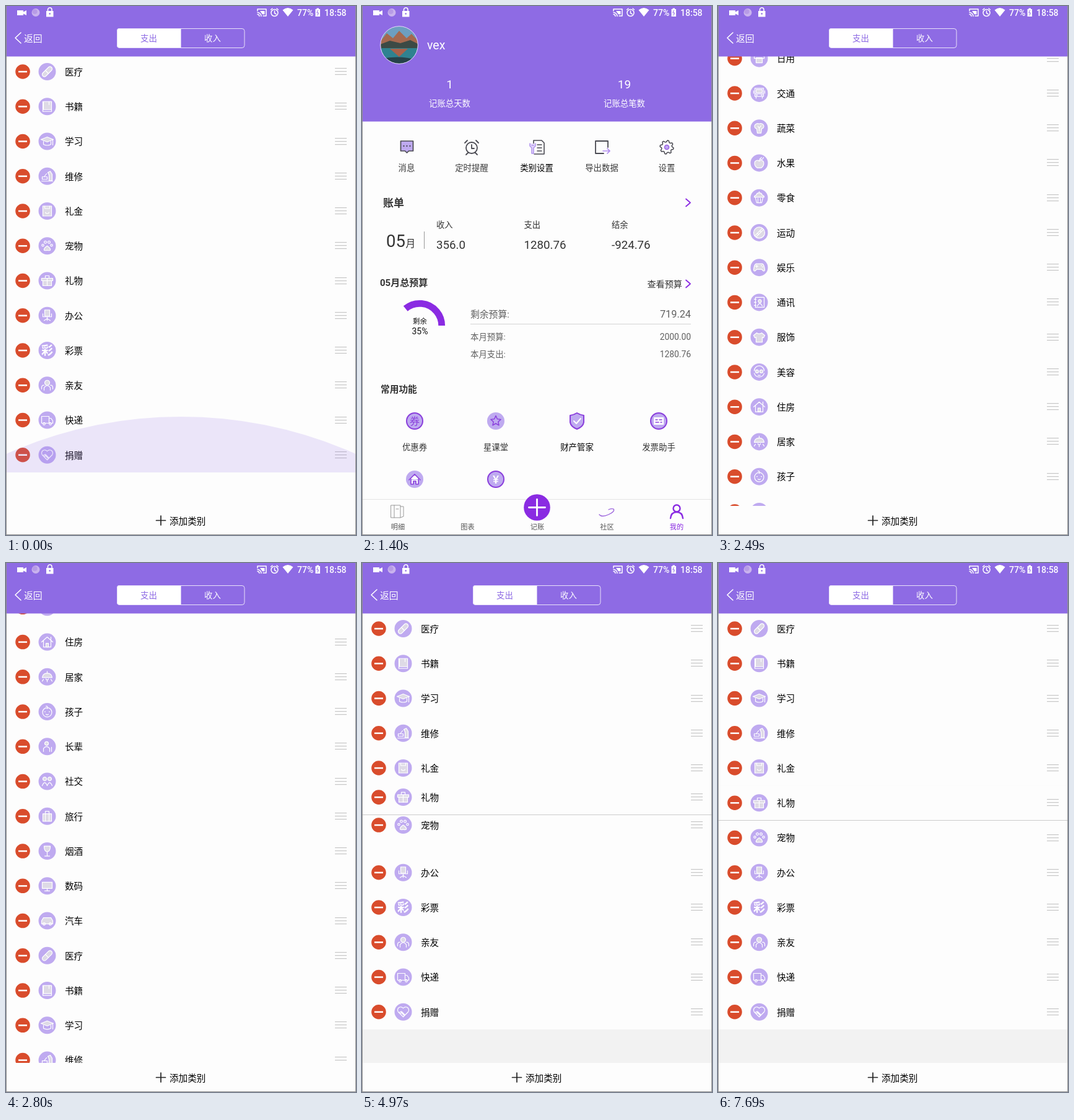
An HTML page with a canvas that plays this animation: 565 by 854 pixels, repeating every 8 s.

```html
<!DOCTYPE html>
<html lang="zh-CN">
<head>
<meta charset="utf-8">
<style>
html, body { margin: 0; width: 565px; height: 854px; overflow: hidden; background: #fdfdfd; }
canvas { display: block; }
</style>
</head>
<body>
<canvas id="stage" width="565" height="854"></canvas>
<script>
const W = 565, H = 854, ROW = 56.25, END = 1184.35, LOOP = 8000;
const PURPLE = '#8e6be4', VIVID = '#8a2be2', LILAC = '#bfaaf0', PAPER = '#fdfdfd', WHITE = '#fff';
const main = document.getElementById('stage').getContext('2d');
const layer = new OffscreenCanvas(W, H).getContext('2d');
let c = main;

const ring = (x, y, r) => `M${x - r} ${y}a${r} ${r} 0 1 0 ${2 * r} 0a${r} ${r} 0 1 0 ${-2 * r} 0`;

// name, filled outline, line work; coordinates are relative to the icon centre
const items = [
  ['餐饮', 'M-8 3A8 8 0 0 1 8 3ZM0-5V-7', 'M-9 5H9M-7 7H7'],
  ['购物', 'M-6-3H6L7 8H-7Z', 'M-3-3V-5A3 3 0 0 1 3-5V-3'],
  ['日用', 'M-5-1H5V7H-5Z', 'M-8-4Q0-10 8-4V0H-8Z'],
  ['交通', 'M-5-6H5V-1H-5Z', 'M-7-8H7V5H-7ZM-7 1H7M-5 5V8M5 5V8M-9-4V0M9-4V0M-5 3H-3M3 3H5'],
  ['蔬菜', 'M-4 1A4 4 0 0 1-7-5Q-4-9 0-7Q4-9 7-5A4 4 0 0 1 4 1L3 8H-3Z', 'M0 0V5M-2-3L0 0L3-4'],
  ['水果', 'M0-3Q-4-6-7-2Q-9 4-3 8H3Q9 4 7-2Q4-6 0-3Z', 'M0-3Q0-7 4-9M2-6Q6-5 7-9'],
  ['零食', 'M-8-1Q-8-4-5-4Q-4-8 0-8Q4-8 5-4Q8-4 8-1Z', 'M-6 0L-4 8H4L6 0M-2 1V7M2 1V7M0-8V-10'],
  ['运动', ring(0, 0, 9), 'M-7 5L5-7M-5 7L7-5M-3 1L-1 3M1-3L3-1'],
  ['娱乐', 'M-5-6H5Q8-5 9 4Q8 8 4 3H-4Q-8 8-9 4Q-8-5-5-6Z', 'M-6-2H-2M-4-4V0M3-3H4M5-1H6'],
  ['通讯', ring(1, -2, 2.5), 'M-6-8H8V8H-6ZM-8-5H-5M-8 0H-5M-8 5H-5M-3 6Q1-2 5 6'],
  ['服饰', 'M-4-7Q0-4 4-7L9-3L7 1L5 0V8H-5V0L-7 1L-9-3Z', ''],
  ['美容', ring(-3.5, -1, 2.5) + ring(3.5, -1, 2.5), 'M-8-2A8 8 0 1 1 8-2M-8 2Q-6 8 0 8Q6 8 8 2M-2 5Q0 6 2 5'],
  ['住房', 'M-2 8V2H2V8Z', 'M-9 0L0-8L9 0M-6-2V8H6V-2M6-4V-8'],
  ['居家', 'M-8 1Q-7-6 0-6Q7-6 8 1Z', 'M0-6V-9M-2 3A2 2 0 0 0 2 3M-6 4L-8 7M6 4L8 7M0 6V8'],
  ['孩子', '', ring(0, 1, 7.5) + 'M-2-9Q2-9 0-5M-4 0H-3M3 0H4M-2 4Q0 6 2 4'],
  ['长辈', ring(-1, -5, 3), 'M-6 8V3Q-1-3 4 3V8M7 8V1'],
  ['社交', ring(-4, -4, 3) + ring(4, -4, 3), 'M-8 7Q-4-3 0 7Q4-3 8 7'],
  ['旅行', 'M-7-4H7V8H-7Z', 'M-3-4V-8H3V-4M-3-4V8M3-4V8'],
  ['烟酒', 'M-5-8H5Q5 1 0 1Q-5 1-5-8Z', 'M0 1V8M-4 8H4'],
  ['数码', 'M-8-6H8V4H-8Z', 'M0 4V8M-4 8H4'],
  ['汽车', 'M-9 0L-6-5H6L9 0V5H-9Z', ring(-5, 5, 2) + ring(5, 5, 2)],
  ['医疗', 'M-7 2L2-7A3.5 3.5 0 0 1 7-2L-2 7A3.5 3.5 0 0 1-7 2Z', 'M-3-2L2 3'],
  ['书籍', 'M-6-8H7V5H-6Z', 'M-7-8V8H7V5M3-8V-3'],
  ['学习', 'M-10-3L0-7L10-3L0 1Z', 'M-6 0V5Q0 8 6 5V0M9-3V6'],
  ['维修', 'M3 7V-2L1-6L5-8L8-3V7Z', 'M-9 8H9M-8 5V1H0V5ZM-5 1L-1-4'],
  ['礼金', 'M-7-8H7V8H-7Z', 'M-4-8V-4H4V-8M-3 2A3 2 0 1 0 3 2'],
  ['宠物', 'M0 0Q6 4 5 7Q2 8 0 7Q-2 8-5 7Q-6 4 0 0Z', ring(-7, -1, 1.7) + ring(-3, -6, 1.9) + ring(3, -6, 1.9) + ring(7, -1, 1.7)],
  ['礼物', 'M-9-4H9V0H-9ZM-7 0H7V8H-7Z', 'M0-4V8M-3-4V-8H3V-4'],
  ['办公', 'M-4-9H4V1H-4Z', 'M-7-3V2H7V-3M0 2V8M-5 8L0 5L5 8'],
  ['彩票', '', ''],
  ['亲友', ring(0, -4, 4), 'M-5 8V4Q0-3 5 4V8M-9 6V3Q-8-1-5 0M9 6V3Q8-1 5 0'],
  ['快递', '', 'M-9-6H3V5H-9ZM3-3H6L9 1V5H3' + ring(-5, 6, 1.8) + ring(5, 6, 1.8)],
  ['捐赠', '', 'M0 8L-8 0A4.5 4.5 0 0 1 0-6A4.5 4.5 0 0 1 8 0ZM-7 1L-3-1L3 5M-5 3L-3 1L2 6'],
];
const PET = 26, GIFT = 27;

const clamp = v => Math.max(0, Math.min(1, v));

// progress that jumps n times, first at a and last at b
const steps = (t, a, b, n) => clamp((Math.floor((t - a + 1) * (n - 1) / (b - a)) + 1) / n);

function rect(x, y, w, h, color) {
  c.fillStyle = color;
  c.fillRect(x, y, w, h);
}

function shape(d, x, y, fill, stroke, width = 1.2) {
  const path = new Path2D(d);
  c.save();
  c.translate(x, y);
  c.lineCap = c.lineJoin = 'round';
  c.lineWidth = width;
  if (fill) { c.fillStyle = fill; c.fill(path); }
  if (stroke) { c.strokeStyle = stroke; c.stroke(path); }
  c.restore();
}

function text(s, x, y, size, color, align = 'left', weight = 400) {
  c.font = `${weight} ${size}px Roboto, "Noto Sans CJK SC", "Noto Sans CJK", sans-serif`;
  c.textAlign = align;
  c.fillStyle = color;
  c.fillText(s, x, y);
}

function statusBar() {
  shape('M18 7H28V9.500L33 7V15L28 12.500V15H18Z', 0, 0, WHITE);
  shape(ring(48, 10.500, 6.500), 0, 0, '#c9b3ee');
  shape(ring(46.500, 9, 4), 0, 0, '#b79be6');
  shape('M65 8H76.500V17.500H65Z', 0, 0, WHITE);
  shape('M67.500 8V6A3.200 3.200 0 0 1 74 6V8', 0, 0, null, WHITE, 1.6);
  shape(ring(70.700, 12.500, 1.3), 0, 0, PURPLE);
  shape('M406 8V5H420V16H415M406 10.500A6 6 0 0 1 412 16.500M406 13.500A3 3 0 0 1 409 16.500', 0, 0, null, WHITE, 1.5);
  shape('M410 8H417.500V13.500H414Z', 0, 0, WHITE);
  shape(ring(433.500, 11, 5.500) + 'M433.500 8V11.500L436 13M427.500 6L430 4M439.500 6L437 4', 0, 0, null, WHITE, 1.5);
  shape('M446.500 6.500Q455-.500 463.500 6.500L455 17Z', 0, 0, WHITE);
  text('77%', 470, 15.5, 14, WHITE, 'left', 500);
  shape('M499.500 5H501.500V3.500H505V5H507V17H499.500Z', 0, 0, WHITE);
  shape('M503.500 7L501.800 11H504.500L503 15', 0, 0, null, PURPLE, 1);
  text('18:58', 514, 15.5, 14, WHITE, 'left', 500);
}

function row(i, y) {
  const [name, body, lines] = items[i];
  shape(ring(27, 0, 11.8), 0, y, '#d94c2c');
  rect(20, y - 1.2, 14, 2.5, WHITE);
  shape(ring(66.500, 0, 14), 0, y, LILAC);
  if (name === '彩票') text('彩', 66.5, y + 6.5, 19, WHITE, 'center', 700);
  if (body) shape(body, 66.5, y, '#dedae6', WHITE);
  if (lines) shape(lines, 66.5, y, null, WHITE);
  text(name, 95, y + 5.8, 14.6, '#000');
  for (const dy of [-6, -1, 4]) rect(531, Math.round(y + dy), 19, 1.2, '#c6c6c6');
}

function listPage({ scroll, drag = 0, pet = 0, divider, footer, glow = 0 }) {
  rect(0, 0, W, H, PAPER);
  const rowY = i => 109.1 + i * ROW - scroll;
  if (footer) rect(0, 753, W, 54, '#f2f2f2');
  items.forEach((item, i) => {
    const y = rowY(i) + (i === PET ? pet : 0);
    if (i !== GIFT && y > 50 && y < 840) row(i, y);
  });
  const y = rowY(GIFT) + drag;
  if (y < 840) {
    if (drag) rect(0, y - 28, W, ROW, PAPER);
    row(GIFT, y);
    if (divider) rect(0, Math.round(y + 28), W, 1, '#cbcbcb');
  }
  if (glow) {
    c.save();
    c.translate(282.5, 753);
    c.scale(1, glow);
    c.beginPath();
    c.rect(-283, -100, 566, 100);
    c.clip();
    shape(ring(0, 602.7, 692.7), 0, 0, 'rgba(142,107,227,.16)');
    c.restore();
  }
  rect(0, 807, W, 47, PAPER);
  shape('M242.500 830.500H257.500M250 823V838', 0, 0, null, '#222', 1.7);
  text('添加类别', 264, 836.5, 14.6, '#000');

  rect(0, 0, W, 81.5, PURPLE);
  shape('M24 43L15 51.500L24 60', 0, 0, null, WHITE, 1.6);
  text('返回', 29, 57.5, 14.8, WHITE);
  shape('M183 36H282.500V67.500H183Q179 67.500 179 63.500V40Q179 36 183 36Z', 0, 0, WHITE);
  shape('M183 36.500H381Q385 36.500 385 40.500V63.500Q385 67.500 381 67.500H183Q179.500 67.500 179.500 63.500V40.500Q179.500 36.500 183 36.500Z', 0, 0, null, '#e9e2fa', 1);
  text('支出', 230.5, 56.5, 13.4, PURPLE, 'center');
  text('收入', 333.5, 56.5, 13.4, WHITE, 'center');
}

function avatar() {
  c.save();
  c.beginPath();
  c.arc(60, 63, 30, 0, 7);
  c.clip();
  rect(29, 32, 62, 62, '#6d9fc0');
  shape('M29 58L40 44L50 52L60 40L72 52L80 45L92 58V70H29Z', 0, 0, '#a5694f');
  shape('M29 62L45 56L62 60L78 55L92 62V70H29Z', 0, 0, '#3c4a45');
  rect(29, 68, 62, 26, '#2f8290');
  shape('M45 69L60 82L74 69Z', 0, 0, '#a8624a');
  shape('M29 86Q60 78 92 88V95H29Z', 0, 0, '#26424a');
  c.restore();
  shape(ring(60, 63, 30.300), 0, 0, null, '#e6dcfa', 1);
}

function menu() {
  const ink = '#4a4a52', y = 228;
  shape('M-10-10H10V6H3L0 9L-3 6H-10Z', 72.5, y, LILAC, ink, 1.7);
  shape(ring(-5, -2, .8) + ring(0, -2, .8) + ring(5, -2, .8), 72.5, y, ink, ink, .8);
  shape(ring(0, 1, 9) + 'M0-4V2H4M-11-7L-7-11M11-7L7-11M-6 9L-9 12M6 9L9 12', 177, y, null, ink, 1.8);
  shape('M-5-11H8L12-7V11H-4M-5-11V-6M1-4H8M1 1H8M1 6H8', 282, y, null, ink, 1.6);
  shape('M-11-6V-2L-8 1V10H-5V1L-2-2V-6M-8-3H-5', 282, y, '#e4d9fa', '#b396ee', 1.6);
  shape('M10 0V-10H-10V10H3', 387, y, null, ink, 1.8);
  shape('M2 6H13M9 2L13 6L9 10', 387, y, null, '#b08cf0', 1.7);
  let gear = '';
  for (let i = 0; i < 32; i++) {
    const a = (i + .5) * Math.PI / 16, r = i % 4 < 2 ? 11 : 8.5;
    gear += `${i ? 'L' : 'M'}${r * Math.cos(a)} ${r * Math.sin(a)}`;
  }
  shape(gear + 'Z', 492, y, null, ink, 1.5);
  shape(ring(0, 0, 3.500), 492, y, LILAC, '#9a5fe6', 1.6);
  ['消息', '定时提醒', '类别设置', '导出数据', '设置'].forEach((s, i) =>
    text(s, 72 + i * 105, 266, 13.4, i === 2 ? '#000' : '#3a3a3a', 'center'));
}

function features() {
  const xs = [85, 216, 347, 479], violet = '#8a3fdc';
  const badge = (x, y) => shape(ring(0, 0, 13), x, y, LILAC, violet, 2);
  badge(85, 670);
  text('券', 85, 676, 16, violet, 'center', 500);
  shape(ring(0, 0, 14), 216, 670, LILAC);
  let star = '';
  for (let i = 0; i < 10; i++) {
    const a = i * Math.PI / 5, r = i % 2 ? 4 : 8.5;
    star += `${i ? 'L' : 'M'}${r * Math.sin(a)} ${-r * Math.cos(a)}`;
  }
  shape(star + 'Z', 216, 670, null, violet, 1.5);
  shape('M0-13Q5-10 11-9V2Q10 9 0 13Q-10 9-11 2V-9Q-5-10 0-13Z', 347, 670, LILAC, violet, 2);
  shape('M-5 0L-1 4L6-4', 347, 670, null, WHITE, 2);
  badge(479, 670);
  shape('M-8-6H8V6H-8Z', 479, 670, WHITE);
  shape('M-5-2H-2M1-2H5M-5 2H0M3 2H5', 479, 670, null, violet, 1.5);
  ['优惠券', '星课堂', '财产管家', '发票助手'].forEach((s, i) =>
    text(s, xs[i], 717, 13.4, i === 2 ? '#000' : '#333', 'center'));
  shape(ring(0, 0, 14), 85, 764, LILAC);
  shape('M-9 1L0-8L9 1M-6 0V8H-2V3H2V8H6V0', 85, 764, WHITE, violet, 1.6);
  badge(216, 764);
  text('¥', 216, 771, 19, WHITE, 'center', 500);
}

function tabBar() {
  rect(0, 796, W, 58, PAPER);
  rect(0, 796, W, 1, '#e4e4e4');
  shape('M-10-10H5V10H-10ZM-5-10V10M5-8H10V8L5 10M-2-4H2', 57, 816, null, '#999', 1);
  shape('M-12 3Q-8 8 3 3Q14-2 11-6Q8-7 3-5', 395, 818, null, '#9a62dc', 1.3);
  shape(ring(0, -5, 5.500) + 'M-10 11Q-9 1 0 1Q9 1 10 11', 508, 816, null, VIVID, 2.4);
  shape(ring(0, 0, 21.300), 282.5, 809.5, VIVID);
  shape('M-13 0H13M0-13V13', 282.5, 809.5, null, WHITE, 2.8);
  ['明细', '图表', '记账', '社区', '我的'].forEach((s, i) =>
    text(s, 58 + i * 112.5, 845, 11.2, i === 4 ? VIVID : '#555', 'center'));
}

function profilePage() {
  const chevron = y => shape('M523 -6L530 0L523 6', 0, y, null, VIVID, 1.8);
  rect(0, 0, W, H, PAPER);
  rect(0, 0, W, 186.5, PURPLE);
  avatar();
  text('vex', 105, 70, 19.5, WHITE);
  [['1', '记账总天数', 141.5], ['19', '记账总笔数', 423.5]].forEach(([n, label, x]) => {
    text(n, x, 133, 19, WHITE, 'center');
    text(label, x, 162, 13.4, WHITE, 'center');
  });
  menu();

  text('账单', 34, 323.5, 17, '#333', 'left', 700);
  chevron(317.5);
  text('05', 39, 389, 27.5, '#333');
  text('月', 70.5, 389, 15.8, '#333');
  rect(100, 364, 1, 28, '#999');
  [['收入', '356.0', 120], ['支出', '1280.76', 261.5], ['结余', '-924.76', 403]].forEach(([label, n, x]) => {
    text(label, x, 358, 13.3, '#333');
    text(n, x, 392, 18.7, '#333');
  });

  text('05月总预算', 29, 452, 15, '#333', 'left', 700);
  text('查看预算', 460.5, 453.5, 14.1, '#333');
  chevron(448.5);
  c.beginPath();
  c.arc(93, 516, 35.7, -.36 * 2 * Math.PI, 0);
  c.strokeStyle = VIVID;
  c.lineWidth = 10.8;
  c.stroke();
  text('剩余', 93.5, 513, 11.4, '#111', 'center');
  text('35%', 93.5, 530, 14, '#111', 'center');
  [['剩余预算:', '719.24', 503, 14.8, 16.3], ['本月预算:', '2000.00', 539, 13.4, 13.8],
   ['本月支出:', '1280.76', 566.5, 13.4, 13.8]].forEach(([label, n, y, a, b]) => {
    text(label, 175, y, a, '#606060');
    text(n, 531, y, b, '#606060', 'right');
  });
  rect(175, 513, 356, 1, '#d4d4d4');
  text('常用功能', 30, 624, 14.7, '#333', 'left', 700);
  features();
  tabBar();
}

function scrubber(alpha) {
  c.save();
  c.globalAlpha = alpha;
  // stacked shade bands: edge top, middle top, strength
  [[704, 717, .1], [734, 734, .1], [758, 768, .18], [796, 796, .13]].forEach(([edge, mid, a]) => {
    const color = `rgba(0,0,0,${a})`;
    rect(0, edge, 20, H - edge, color);
    rect(20, mid, 527, H - mid, color);
    rect(547, edge, 18, H - edge, color);
  });
  rect(0, 829, 477, 2.5, '#3ba7ab');
  rect(499, 829.5, 66, 2, '#b5b5b5');
  shape(ring(487.5, 830.5, 11.5), 0, 0, null, '#3ba7ab', 2.4);
  c.restore();
}

function opening(t) {
  const k = Math.round(steps(t, 860, 1650, 13) * 13);
  profilePage();
  if (k < 5) scrubber(1 - (k - 1) / 4);
  let alpha = k < 12 ? 0 : k === 12 ? .33 : .67;
  let lift = k === 12 ? 56 : 33;
  if (t >= 1770) { alpha = 1; lift = 8; }
  if (t >= 1850) lift = 0;
  if (!alpha) return;
  c = layer;
  listPage({ scroll: 0 });
  c = main;
  c.globalAlpha = alpha;
  c.drawImage(layer.canvas, 0, lift);
  c.globalAlpha = 1;
}

function scene(t) {
  if (t < 860) return listPage({ scroll: END, glow: t < 60 ? 1 : t < 190 ? .7 : .4 });
  if (t < 2490) return opening(t);
  const fling = 1 - (1 - steps(t, 2490, 3080, 10)) ** 1.166;
  const pull = steps(t, 4620, 5200, 11), settle = steps(t, 5380, 5630, 5);
  const ease = pull * pull * (3 - 2 * pull);
  listPage({
    scroll: END * fling,
    drag: -93.5 * ease + (93.5 - ROW) * settle,
    pet: ROW * clamp((pull - .35) / .45),
    divider: t >= 3870 && (settle < 1 || t >= 6000),
    footer: t >= 3870,
  });
}

function frame() {
  scene(performance.now() % LOOP);
  statusBar();
  rect(0, 0, 1, H, '#8f8f8f');
  rect(W - 1, 0, 1, H, '#8f8f8f');
  rect(0, H - 1, W, 1, '#8f8f8f');
  requestAnimationFrame(frame);
}
frame();
</script>
</body>
</html>
```
